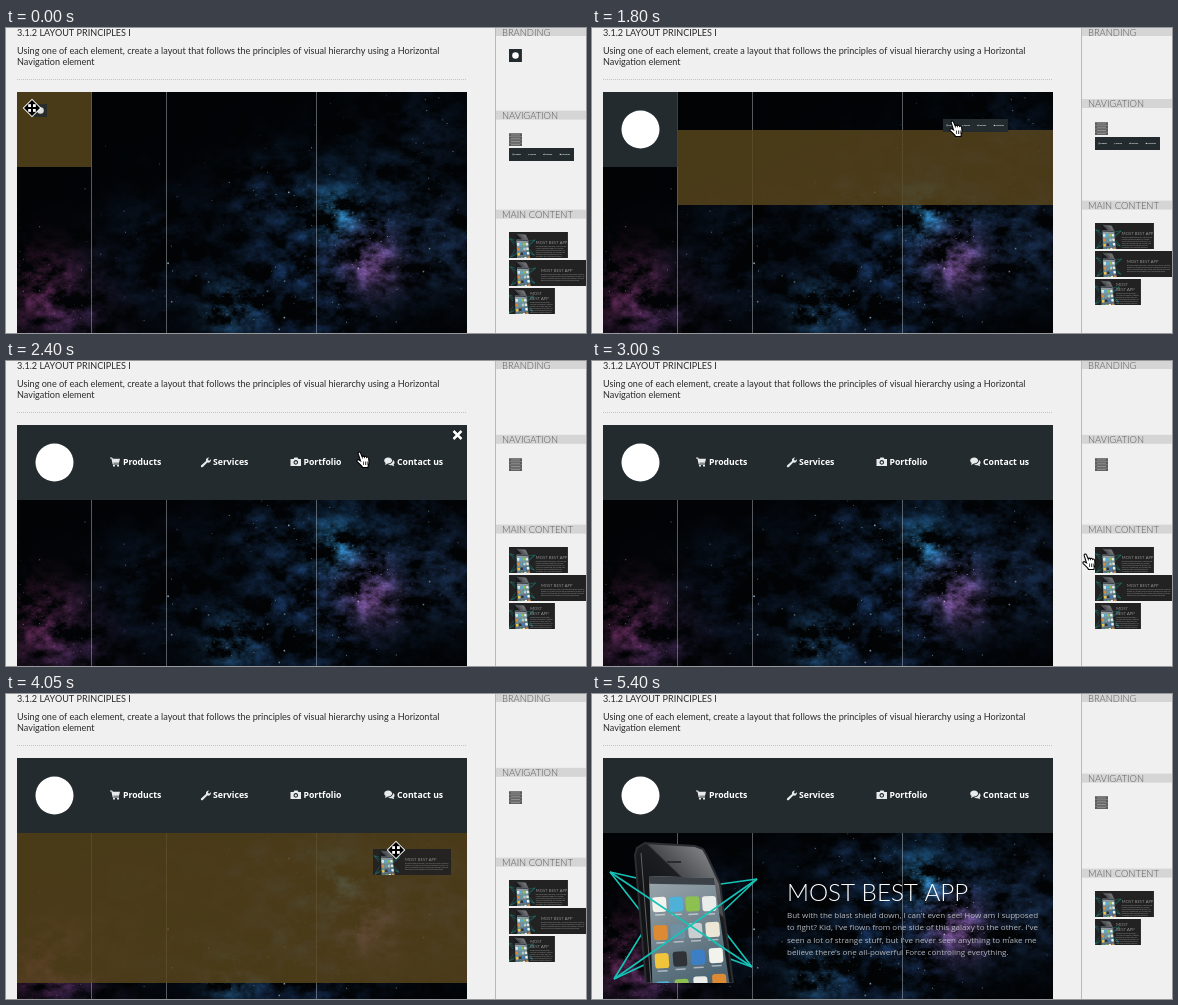
An HTML page with a canvas for the animation above (5.91 s loop, 580 by 305 pixels).

```html
<!DOCTYPE html>
<html lang="en">
<head>
<meta charset="utf-8">
<title>Layout principles</title>
<style>
  html, body { margin: 0; width: 100%; height: 100%; overflow: hidden; background: #f0f0f0; }
  canvas { display: block; }
</style>
</head>
<body>
<canvas id="stage" width="580" height="305"></canvas>
<script>
const ctx = document.getElementById('stage').getContext('2d');
const LOOP = 5910, STEP = 150;
const LATO = 'Lato, sans-serif', OPEN = '"Open Sans", sans-serif';
const THUMB = 0.1733;
const PANEL = '#232b2f';

const box = (x, y, w, h, fill, c = ctx) => { c.fillStyle = fill; c.fillRect(x, y, w, h); };

function text(str, x, y, font, fill) {
  ctx.font = font;
  ctx.fillStyle = fill;
  ctx.fillText(str, x, y);
}

function poly(points) {
  ctx.beginPath();
  points.forEach(([x, y]) => ctx.lineTo(x, y));
  ctx.closePath();
}

function at(x, y, scale, draw) {
  ctx.save();
  ctx.translate(x, y);
  ctx.scale(scale, scale);
  draw();
  ctx.restore();
}

// Position along [time, x, y] keys
function along(keys, t) {
  let i = 0;
  while (i < keys.length - 2 && t >= keys[i + 1][0]) i++;
  const [t0, x0, y0] = keys[i], [t1, x1, y1] = keys[i + 1];
  const k = Math.min(1, Math.max(0, (t - t0) / (t1 - t0)));
  return [Math.round(x0 + (x1 - x0) * k), Math.round(y0 + (y1 - y0) * k)];
}

// ---- Night sky ----
const hash = (x, y) => {
  const s = Math.sin(x * 127.1 + y * 311.7) * 43758.5453;
  return s - Math.floor(s);
};

function noise(x, y) {
  const ix = Math.floor(x), iy = Math.floor(y);
  const ease = f => f * f * (3 - 2 * f);
  const fx = ease(x - ix), fy = ease(y - iy);
  const top = hash(ix, iy) * (1 - fx) + hash(ix + 1, iy) * fx;
  const low = hash(ix, iy + 1) * (1 - fx) + hash(ix + 1, iy + 1) * fx;
  return top * (1 - fy) + low * fy;
}

function fbm(x, y) {
  let sum = 0, amp = 0.45;
  for (let i = 0; i < 5; i++) {
    sum += amp * noise(x, y);
    x = x * 2.1 + 17;
    y = y * 2.1 + 31;
    amp *= 0.62;
  }
  return sum;
}

// x, y, radius, r, g, b
const clouds = [
  [330, 135, 72, 8, 20, 34], [318, 122, 22, 14, 48, 62], [352, 170, 30, 52, 20, 40],
  [214, 216, 26, 16, 40, 58], [22, 195, 38, 42, 15, 32], [430, 150, 55, 8, 14, 24],
  [140, 165, 60, 5, 10, 18], [280, 205, 70, 7, 15, 28], [50, 228, 45, 18, 11, 24],
  [410, 40, 50, 4, 8, 14], [240, 100, 38, 5, 10, 18]
];

function glow(x, y) {
  const rgb = [0, 0, 0];
  for (const [cx, cy, r, ...col] of clouds) {
    const k = Math.exp(-((x - cx) ** 2 + (y - cy) ** 2) / (r * r));
    col.forEach((v, i) => rgb[i] += v * k);
  }
  return rgb;
}

function makeSky() {
  const w = 450, h = 241;
  const sky = document.createElement('canvas');
  sky.width = w;
  sky.height = h;
  const c = sky.getContext('2d'), img = c.createImageData(w, h);
  for (let y = 0, p = 0; y < h; y++) {
    for (let x = 0; x < w; x++, p += 4) {
      const n = Math.max(0, fbm(x / 22, y / 16) - 0.38) * 5.5;
      const rgb = glow(x, y);
      for (let i = 0; i < 3; i++) img.data[p + i] = 1 + i * 2 + rgb[i] * n;
      img.data[p + 3] = 255;
    }
  }
  c.putImageData(img, 0, 0);
  for (let i = 0; i < 1000; i++) {
    const x = hash(i, 1) * w, y = hash(i, 2) * h;
    const [r, g, b] = glow(x, y);
    if (hash(i, 3) * 90 > g + b + 3) continue;
    const size = hash(i, 4) > 0.95 ? 1.6 : 0.9;
    c.globalAlpha = 0.15 + 0.6 * hash(i, 5) ** 3;
    box(x, y, size, size, r > g ? '#e3bfe0' : '#b9dcf2', c);
  }
  return sky;
}
const sky = makeSky();

// ---- Page parts ----
function logo() {
  box(0, 0, 74.5, 75, PANEL);
  ctx.fillStyle = '#fff';
  ctx.beginPath();
  ctx.arc(37.5, 37.5, 19, 0, 7);
  ctx.fill();
}

const icons = {
  cart: new Path2D('M0 0H2L3 1.2H10L9 5.2H3.4L3.6 6H9V7H2.7L1.4 1H0ZM3 7.5H5V9H3ZM7 7.5H9V9H7Z'),
  wrench: new Path2D('M0 8L5 3.5C4.5 1.5 6 0 8.3 0L6.7 1.8 8 3.2 10 1.7C10.2 4 8.5 5.6 6.3 5L1.8 9.6C.6 10.4-.6 9.2 0 8Z'),
  camera: new Path2D('M0 1.5H3L4 0H7L8 1.5H10.5V8.5H0ZM5.3 2.6A2.3 2.3 0 1 0 5.31 2.6ZM5.3 3.7A1.2 1.2 0 1 1 5.29 3.7Z'),
  chat: new Path2D('M4 0C9.5 0 9.5 6 4 6L1 7.5 1.6 5.4C-.8 4 0 0 4 0ZM9 2.6C11 3.6 11 6 9.6 6.9L10.3 8.8 7.6 7.7C6 8 4.8 7.5 4 6.9 7.5 6.8 9 5 9 2.6Z')
};

// Menu row; its left edge stands at x = 86 on the page
function menu() {
  box(0, 0, 375, 75, PANEL);
  [['cart', 'Products', 18, 31], ['wrench', 'Services', 109, 121],
   ['camera', 'Portfolio', 198.5, 211.5], ['chat', 'Contact us', 292, 305]].forEach(([icon, label, ix, tx]) => {
    at(ix, 32.5, 1, () => { ctx.fillStyle = '#e8eaeb'; ctx.fill(icons[icon], 'evenodd'); });
    text(label, tx, 40, '700 8.7px ' + OPEN, '#fff');
  });
}

const appColors = ['#e9ece8', '#f3f3ee', '#f0c53c', '#6f8fa3', '#8cc152', '#3d7fc4', '#ece6d6', '#dd8a35', '#4fb0d8', '#2f3338', '#c9ced0'];

function rays(lines) {
  ctx.strokeStyle = '#14c4b8';
  ctx.lineWidth = 1.6;
  ctx.beginPath();
  lines.forEach(([a, b]) => { ctx.moveTo(...a); ctx.lineTo(...b); });
  ctx.stroke();
}

function phone() {
  const nw = [7, 39], ne = [154, 46], se = [149, 134], sw = [11, 146];
  rays([[nw, [82, 56]], [ne, [82, 56]], [ne, [112, 86]], [se, [112, 86]],
    [se, [86, 111]], [sw, [86, 111]], [sw, [46, 89]], [nw, [46, 89]]]);

  const body = ctx.createLinearGradient(40, 60, 92, 6);
  body.addColorStop(0, '#121315');
  body.addColorStop(0.5, '#1d1e21');
  body.addColorStop(0.52, '#4a4b4e');
  body.addColorStop(1, '#808285');
  poly([[32, 22], [34, 15], [42, 10], [92, 13], [100, 16], [104, 23], [117, 51], [130, 150], [43, 150]]);
  ctx.fillStyle = body;
  ctx.fill();
  ctx.strokeStyle = '#2b2d31';
  ctx.lineWidth = 2;
  ctx.stroke();
  ctx.strokeStyle = '#5d6066';
  ctx.lineWidth = 1;
  ctx.beginPath();
  ctx.moveTo(38, 20);
  ctx.lineTo(48, 150);
  ctx.stroke();
  ctx.strokeStyle = '#2a2b2e';
  ctx.lineWidth = 2;
  ctx.beginPath();
  ctx.moveTo(64, 29);
  ctx.lineTo(78, 29);
  ctx.stroke();

  const tl = [46, 43], tr = [111, 45], br = [128, 161], bl = [50, 173];
  const spot = (u, v) => [0, 1].map(i =>
    (tl[i] * (1 - u) + tr[i] * u) * (1 - v) + (bl[i] * (1 - u) + br[i] * u) * v);
  const glass = ctx.createLinearGradient(50, 45, 100, 150);
  glass.addColorStop(0, '#9ba6ac');
  glass.addColorStop(1, '#4c6472');
  poly([tl, tr, br, bl]);
  ctx.fillStyle = glass;
  ctx.fill();
  poly([tl, tr, spot(1, 0.06), spot(0, 0.06)]);
  ctx.fillStyle = '#3b4146';
  ctx.fill();
  for (let i = 0; i < 16; i++) {
    const [x, y] = spot(0.14 + (i % 4) * 0.245, 0.22 + Math.floor(i / 4) * 0.22);
    ctx.save();
    ctx.translate(x, y);
    ctx.transform(1, -0.05, 0.07, 1, 0, 0);
    ctx.fillStyle = appColors[(i * 7 + 1) % appColors.length];
    ctx.beginPath();
    ctx.roundRect(-7, -7.5, 14, 15, 3);
    ctx.fill();
    box(-5, 9.5, 10, 1.5, 'rgba(255,255,255,.5)');
    ctx.restore();
  }
  rays([[nw, se], [ne, sw]]);
}

const COPY = "But with the blast shield down, I can't even see! How am I supposed to fight? Kid, " +
  "I've flown from one side of this galaxy to the other. I've seen a lot of strange stuff, but I've " +
  "never seen anything to make me believe there's one all-powerful Force controling everything.";

function wrapped(str, x, y, width, leading, font, fill) {
  ctx.font = font;
  let line = '';
  for (const word of str.split(' ')) {
    const next = line ? line + ' ' + word : word;
    if (line && ctx.measureText(next).width > width) {
      text(line, x, y, font, fill);
      y += leading;
      line = word;
    } else line = next;
  }
  text(line, x, y, font, fill);
}

function feature(width, textX, copyW, titles, phoneX, back) {
  ctx.save();
  ctx.beginPath();
  ctx.rect(0, 0, width, 150);
  ctx.clip();
  if (back) box(0, 0, width, 150, back);
  at(phoneX, 0, 1, phone);
  const y = titles.length > 1 ? 40 : 68;
  titles.forEach((s, i) => text(s, textX, y + i * 28, '300 24.2px ' + LATO, back ? '#ddd' : '#fff'));
  wrapped(COPY, textX, y + 17 + (titles.length - 1) * 28, copyW, 12.4, '8px ' + OPEN, back ? '#a8a8a8' : '#b4b6b9');
  ctx.restore();
}

const wide = back => feature(450, 184, 256, ['MOST BEST APP'], 0, back);
const middle = () => feature(340, 155, 178, ['MOST BEST APP'], -3, '#222');
const narrow = () => feature(265, 122, 134, ['MOST', 'BEST APP'], -12, '#222');

const heading = (label, y) => text(label, 496, y, '300 9.4px ' + LATO, '#555');

function band(label, y) {
  box(490, y - 0.4, 90, 9, '#d5d5d5');
  heading(label, y + 7.8);
}

function sidebar(s) {
  box(489, 0, 1, 305, '#b9b9b9');
  box(490, 0, 90, 8, '#d5d5d5');
  heading('BRANDING', 8);
  if (!s.logo) at(503, 21, THUMB, logo);

  const navY = s.app ? 80 : s.menu ? 74.2 : s.logo ? 71.4 : 83;
  const mainY = s.app ? 175 : s.menu ? 164 : s.logo ? 173 : 182;
  band('NAVIGATION', navY);
  const y = Math.round(navY + 22.4);
  box(503, y, 13, 13, '#5c5c5c');
  for (let i = 0; i < 4; i++) {
    box(503, y + 3.25 * i, 13, 0.7, '#8a8a8a');
    box(505, y + 1.5 + 3.25 * i, 9, 0.9, '#979797');
  }
  if (!s.menu) at(503, y + 15, THUMB, menu);

  band('MAIN CONTENT', mainY);
  const items = s.app ? [middle, narrow] : [middle, () => wide('#222'), narrow];
  items.forEach((item, i) => at(503, mainY + 22 + i * 28, THUMB, item));
}

// ---- Pointers ----
const handShape = new Path2D('M4.5 9.8L2.2 2.7C1.8 1 3.8.4 4.5 1.9L6.2 6C6.3 4.8 8 4.8 8.4 6C8.7 5 10.3 5 10.6 6.4C11.2 5.8 12.6 6 12.7 7.4L13 11C13 13 12 14 12 16.5H6.5C6 14.5 3 12.5 1.2 10.6C.2 9.2 1.8 8.2 3 9Z');

function hand([x, y]) {
  at(x, y, 1, () => {
    ctx.fillStyle = '#fff';
    ctx.strokeStyle = '#000';
    ctx.lineWidth = 1.1;
    ctx.fill(handShape);
    ctx.stroke(handShape);
    [7.2, 9, 10.8].forEach(fx => box(fx, 10.5, 0.8, 3.5, '#222'));
  });
}

function mover([x, y]) {
  at(x, y, 1, () => {
    [[9.3, '#fff'], [8, '#000']].forEach(([r, fill]) => {
      poly([[0, -r], [r, 0], [0, r], [-r, 0]]);
      ctx.fillStyle = fill;
      ctx.fill();
    });
    [-1, 1].forEach(i => [-1, 1].forEach(j => box(i * 2.4 - 1.4, j * 2.4 - 1.4, 2.8, 2.8, '#fff')));
  });
}

function closeMark(right, top) {
  const x = right - 9.5, y = top + 10;
  [['#15191b', 4.5], ['#fff', 2.6]].forEach(([stroke, w]) => {
    ctx.strokeStyle = stroke;
    ctx.lineWidth = w;
    ctx.beginPath();
    ctx.moveTo(x - 4, y - 4); ctx.lineTo(x + 4, y + 4);
    ctx.moveTo(x + 4, y - 4); ctx.lineTo(x - 4, y + 4);
    ctx.stroke();
  });
}

const zone = (x, y, w, h) => box(x, y, w, h, 'rgba(90,70,29,.82)');

const handPath = [[150, 20, 74], [900, 501, 116], [1050, 509, 110], [1200, 509, 110], [1350, 472, 107],
  [1650, 390, 98], [1800, 357, 92], [1950, 352, 91], [2100, 350, 90], [2400, 350, 90], [3150, 525, 218],
  [4800, 525, 218], [4950, 384, 148], [5100, 450, 180], [5250, 545, 230]];
const movePath = [[3600, 532, 226], [3750, 448, 188], [3900, 412, 168], [4050, 390, 156]];
const cardPath = [[3750, 451, 198], [3900, 399, 172], [4050, 367, 155]];

function draw(time) {
  const t = Math.floor(time / STEP) * STEP;
  const s = { logo: t >= 150, menu: t >= 2400, app: t >= 4950 };
  const moving = t < 150 || (t >= 3450 && t < 4950);
  const pos = along(handPath, t);
  const body = '9.09px ' + LATO;

  box(0, 0, 580, 305, '#f0f0f0');
  text('3.1.2 LAYOUT PRINCIPLES I', 11, 8, body, '#2a2a2a');
  text('Using one of each element, create a layout that follows the principles of visual hierarchy using a Horizontal', 11, 26, body, '#2a2a2a');
  text('Navigation element', 11, 37, body, '#2a2a2a');
  for (let x = 11; x < 461; x += 2) box(x, 51, 1, 1, '#c4c4c4');

  ctx.drawImage(sky, 11, 64);
  [85, 160, 310].forEach(x => box(x, 64, 1, 241, 'rgba(190,196,200,.45)'));

  if (s.logo) at(11, 64, 1, logo);
  if (s.menu) {
    box(85, 64, 1, 75, PANEL);
    at(86, 64, 1, menu);
  }
  if (s.app) at(11, 139, 1, () => wide());
  sidebar(s);

  if (t < 150) {
    zone(11, 64, 74, 75);
    ctx.globalAlpha = 0.85;
    at(28, 76, THUMB, logo);
  } else if (t >= 1350 && t < 2400) {
    if (t >= 1800) zone(86, t < 1950 ? 102 : 64, 375, 75);
    at(pos[0] - 6, pos[1] - 1, THUMB, menu);
  } else if (t >= 3750 && t < 4950) {
    if (t >= 3900) zone(11, 139, 450, 150);
    ctx.globalAlpha = 0.95;
    at(...along(cardPath, t), THUMB, () => wide('#222'));
  }
  ctx.globalAlpha = 1;

  if (moving) mover(t < 150 ? [26, 80] : along(movePath, t));
  else if (t < 5400) {
    const [x, y] = pos;
    if (s.logo && x < 85 && y < 139) closeMark(85, 64);
    else if (s.menu && x < 461 && y < 139) closeMark(461, 64);
    else if (s.app && x < 461) closeMark(461, 139);
    hand(pos);
  }
}

const start = performance.now();
function tick() {
  draw((performance.now() - start) % LOOP);
  requestAnimationFrame(tick);
}
tick();
</script>
</body>
</html>
```
